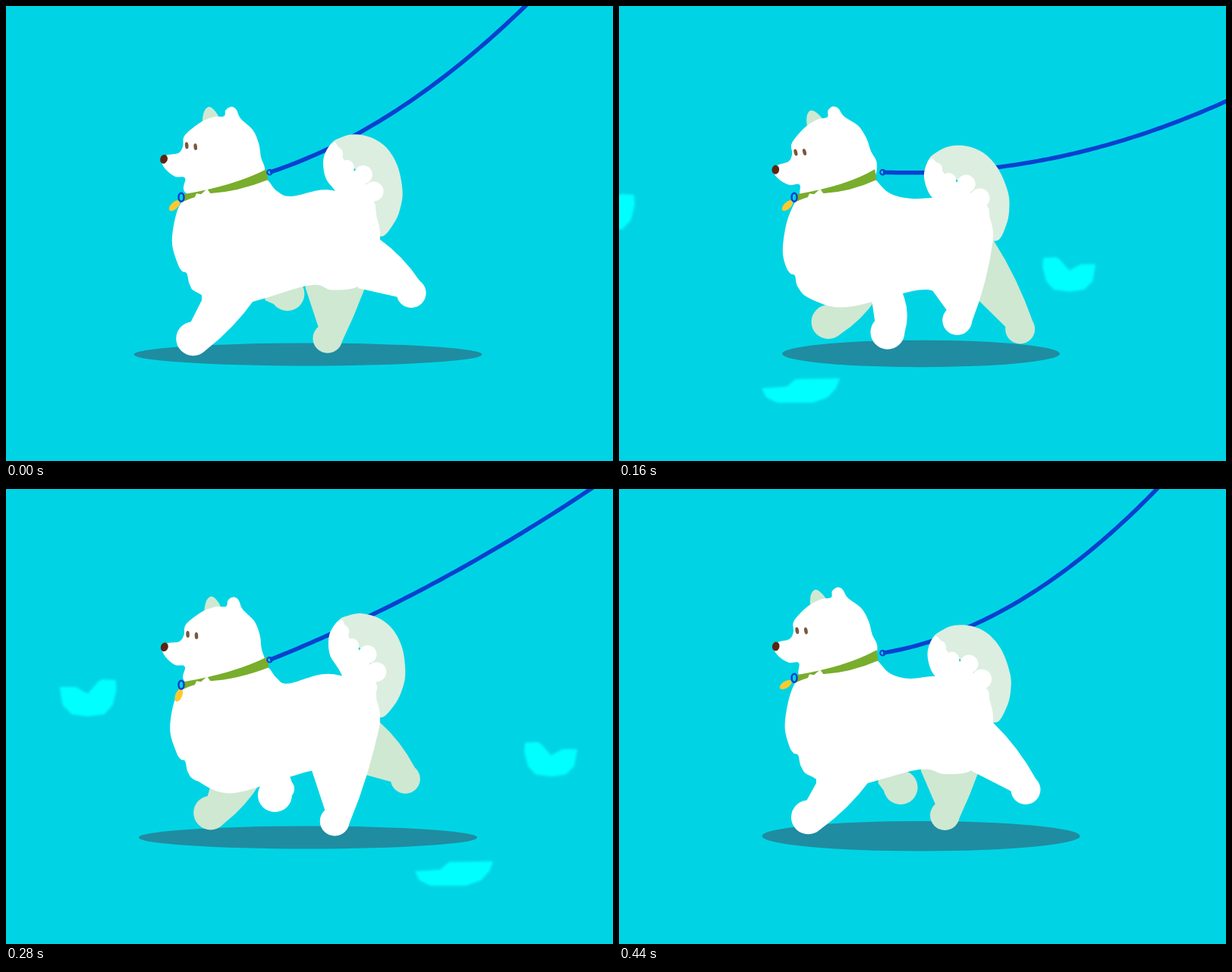
An HTML page with a canvas for the animation above (520 ms loop, 800 by 600 pixels).

```html
<!DOCTYPE html>
<html lang="en">
<head>
<meta charset="utf-8">
<title>Dog on a walk</title>
<style>
html, body { margin: 0; height: 100%; overflow: hidden; background: #00d4e4; }
canvas { display: block; }
</style>
</head>
<body>
<canvas id="stage" width="800" height="600"></canvas>
<script>
const ctx = document.getElementById('stage').getContext('2d');
const SKY = '#00d4e4', SHADOW = '#1f8ca1', BLOB = '#00ffff', WHITE = '#ffffff',
  FAR = '#cfe8d1', TAIL = '#dceee0', BLUE = '#0a40d0', GREEN = '#79ad2c',
  GOLD = '#fcca30', NOSE = '#5c2412', EYE = '#7b573c';
const STEP = 40, STEPS = 12, LOOP = 520;
const rad = deg => deg * Math.PI / 180;

// Mean value plus cosine and sine amplitudes of successive harmonics.
function swing(angle, mean, ...amps) {
  return amps.reduce((sum, amp, i) => {
    const a = angle * (1 + (i >> 1));
    return sum + amp * (i % 2 ? Math.sin(a) : Math.cos(a));
  }, mean);
}

const head = [[238, 248], [236, 228], [223, 226], [211, 217], [205, 206], [211, 198], [227, 195], [233, 186],
  [234, 174], [243, 164], [258, 153], [274, 147], [287, 146], [289, 138], [296, 133.5], [303, 137], [309, 149],
  [325, 164], [333, 182], [336, 200], [341, 218], [330, 240], [290, 262]];
const farEar = [[260, 158], [260, 142], [266, 134], [273, 137], [280, 148], [276, 160]];
const tailBack = [[428, 183], [441, 174], [458, 170], [480, 174], [500, 187], [515, 211], [522, 244],
  [519, 268], [511, 287], [496, 304], [478, 290], [470, 230], [440, 200]];
const tailFront = [[432, 181], [420, 194], [417, 210], [421, 229], [434, 246], [460, 283], [484, 285],
  [484, 255], [468, 228], [446, 206]];
const tailFur = [[434, 196, 9], [448, 214, 10], [470, 223, 12], [484, 245, 13], [478, 266, 9]];
const cup = [[1, 10], [22, 10], [38, 19], [52, 3], [57, 0], [75, 1], [76, 14], [71, 34], [60, 46],
  [38, 49], [17, 46], [5, 34]];
const puff = [[0, 13], [33, 11], [45, 1], [103, 0], [98, 13], [87, 25], [68, 32], [20, 32], [6, 25]];

function fill(colour) { ctx.fillStyle = colour; ctx.fill(); }

function ellipse(x, y, rx, ry, colour, turn = 0) {
  ctx.beginPath();
  ctx.ellipse(x, y, rx, ry, turn, 0, 7);
  fill(colour);
}

function ring(x, y, rx, ry, width) {
  ctx.strokeStyle = BLUE;
  ctx.lineWidth = width;
  ctx.beginPath();
  ctx.ellipse(x, y, rx, ry, 0, 0, 7);
  ctx.stroke();
}

// Closed curve through all points.
function smooth(points, colour) {
  const at = i => points[(i + points.length) % points.length];
  ctx.beginPath();
  ctx.moveTo(...points[0]);
  points.forEach(([x, y], i) => {
    const [px, py] = at(i - 1), [qx, qy] = at(i + 1), [rx, ry] = at(i + 2);
    ctx.bezierCurveTo(x + (qx - px) / 6, y + (qy - py) / 6, qx - (rx - x) / 6, qy - (ry - y) / 6, qx, qy);
  });
  fill(colour);
}

function turned(x, y, degrees, dy, draw) {
  ctx.save();
  ctx.translate(x, y + dy);
  ctx.rotate(rad(degrees));
  ctx.translate(-x, -y);
  draw();
  ctx.restore();
}

// Tapered limb from the front (fx, fy) and back (bx, by) of its root to a round foot.
function limb(fx, fy, bx, by, x, y, r, colour) {
  const mx = (fx + bx) / 2, my = (fy + by) / 2, len = Math.hypot(x - mx, y - my);
  const c = (x - mx) / len, s = (y - my) / len;
  const hx = x + s * r, hy = y - c * r;
  ctx.beginPath();
  ctx.moveTo(fx, fy);
  ctx.lineTo(x - (c * .6 + s * .75) * r, y - (s * .6 - c * .75) * r);
  ctx.lineTo(x, y);
  ctx.lineTo(hx, hy);
  ctx.quadraticCurveTo((hx + bx) / 2 + s * 7, (hy + by) / 2 - c * 7, bx, by);
  ctx.lineTo(bx - 10, by - 30);
  ctx.lineTo(fx, fy - 35);
  fill(colour);
  ellipse(x, y, r, r, colour);
}

function foreleg(a, colour, dx = 0, dy = 0) {
  const x = swing(a, 311, -59.6, 13.5, -4.7, 1);
  const y = swing(a, 425.8, 18.1, 5, -10.2, 1.2, 5);
  const reach = x - 311;
  limb(303 + .7 * reach, 388, 357 + .45 * reach, 386, x + dx, y + dy, 22.5, colour);
}

function hindleg(a, colour, dx = 0, dy = 0) {
  const x = swing(a, 481, 57.6, -11.7, -4.5, -1.7);
  const y = swing(a, 414.2, -25.9, -17, -6.8, -1.9, -3, 2);
  limb(432 + .6 * (x - 481), 372, 493, 308, x + dx, y + dy, 19.5, colour);
}

function blob(shape, x, y, sx = 1, sy = 1) {
  ctx.save();
  ctx.filter = 'blur(1.5px)';
  ctx.translate(x, y);
  ctx.scale(sx, sy);
  ctx.beginPath();
  shape.forEach(p => ctx.lineTo(...p));
  fill(BLOB);
  ctx.restore();
}

// Parabola from the collar through swinging heights at x = 575 and x = 750.
function leash(a, startY) {
  const midY = swing(a, 142.2, -28, 12.4, -19.2, -27, 0, 9);
  const farY = swing(a, 33, -70.5, 36.3, -30.4, -37, 0, 15);
  const slope = (midY - startY) / 227;
  const bend = ((farY - midY) / 175 - slope) / 402;
  ctx.strokeStyle = BLUE;
  ctx.lineWidth = 5.5;
  ctx.beginPath();
  for (let x = 348; x < 820; x += 6) {
    ctx.lineTo(x, startY + (x - 348) * (slope + bend * (x - 575)));
  }
  ctx.stroke();
}

function torso(p, neckX, neckY) {
  const chestX = swing(p, 216, 2.8, -1.4), chestY = swing(p, 319, -8.3, 2.9);
  const ruffX = swing(p, 228, 4.3), ruffY = swing(p, 354.5, -4.7, 4.6);
  const crotchY = swing(p, 373, -4.5, .9), dipY = swing(p, 255.3, -4.2, 3.8);
  smooth([[250, 240 + neckY], [236, 252 + neckY], [chestX + 6, chestY - 38], [chestX, chestY],
    [ruffX - 6, ruffY - 10], [ruffX, ruffY], [ruffX + 6, ruffY + 3], [ruffX + 10, ruffY + 18],
    [252, swing(p, 385.5, -7.7, 4)], [300, swing(p, 399, -4, 4.5)],
    [swing(p, 399, 0, 4.6), crotchY], [430, crotchY + 6], [466, crotchY], [486, 335],
    [493, 304], [489, 280], [480, 260], [425, swing(p, 248.3, -5.8, -2)],
    [swing(p, 379, -2.8, -6), dipY], [357, dipY - 7], [neckX, 229 + neckY], [328, 222 + neckY]], WHITE);
}

function face() {
  ellipse(238, 185, 2.3, 4.5, EYE, -.1);
  ellipse(249.5, 186.5, 2.3, 4.5, EYE, -.1);
  ellipse(208, 203, 4.8, 6, NOSE, .3);
}

function collar(right, y, tagAngle) {
  ctx.save();
  ctx.translate(0, y);
  ctx.beginPath();
  ctx.moveTo(234, 248);
  ctx.quadraticCurveTo(300, 237, right - 2, 215);
  ctx.lineTo(right, 229);
  ctx.quadraticCurveTo(305, 245, 268, 247);
  ctx.quadraticCurveTo(245, 252, 233, 258);
  fill(GREEN);
  ctx.beginPath();
  [[248, 254], [251, 247], [257, 248], [265, 241], [271, 249]].forEach(q => ctx.lineTo(...q));
  fill(WHITE);
  ellipse(231 - 15 * Math.sin(tagAngle), 251 + 15 * Math.cos(tagAngle), 4.5, 9, GOLD, tagAngle + .17);
  ring(231, 252, 3.5, 5.5, 2.5);
  ring(347.5, 219, 3.3, 3.3, 2);
  ctx.restore();
}

function draw(n) {
  // A whole stride takes all steps; the body bobs twice per stride.
  const near = rad(30 * n), far = near + Math.PI, bob = 2 * near;
  const headY = swing(bob, 5.75, -6.4, 9.4, 0, -2.2);
  const headTurn = swing(bob, -3.6, 3.9, 4.7);
  const collarX = 345 + .6 * headTurn, collarY = swing(bob, 3.2, -3, 5.2);
  const tailTurn = swing(bob, -2.75, 3.5, 7.5);
  const squash = 7.5 * (Math.max(0, n - 1) % 6 / 5) ** 2;
  const onHead = shape => turned(290, 220, headTurn, headY, shape);
  const onTail = shape => turned(490, 290, tailTurn, -.6 * tailTurn, shape);

  ctx.fillStyle = SKY;
  ctx.fillRect(0, 0, 800, 600);
  ellipse(398, 459.5 - .38 * squash, swing(bob, 203, 26.5, 7.8), 15 + squash, SHADOW);
  blob(cup, 28 + 41.6 * (n - 6), 244 + n);
  blob(cup, 629 + 41.6 * (n - 4), 328 + .8 * n, -.93, .93);
  blob(puff, 188 + 117 * (n - 4), 491);

  leash(near, 219 + collarY);
  onTail(() => smooth(tailBack, TAIL));
  hindleg(far, FAR, 5, 2);
  foreleg(far, FAR, 5, -13);
  onTail(() => {
    smooth(tailFront, WHITE);
    tailFur.forEach(([x, y, r]) => ellipse(x, y, r, r, WHITE));
  });
  onHead(() => {
    smooth(farEar, FAR);
    smooth(head, WHITE);
  });
  torso(bob, collarX - 1, collarY);
  hindleg(near, WHITE);
  foreleg(near, WHITE);
  onHead(face);
  collar(collarX, collarY, rad(swing(bob, 24.7, 11.8, -21)));
}

function tick() {
  draw(Math.min(STEPS - 1, Math.floor(performance.now() % LOOP / STEP)));
  requestAnimationFrame(tick);
}
tick();
</script>
</body>
</html>
```
